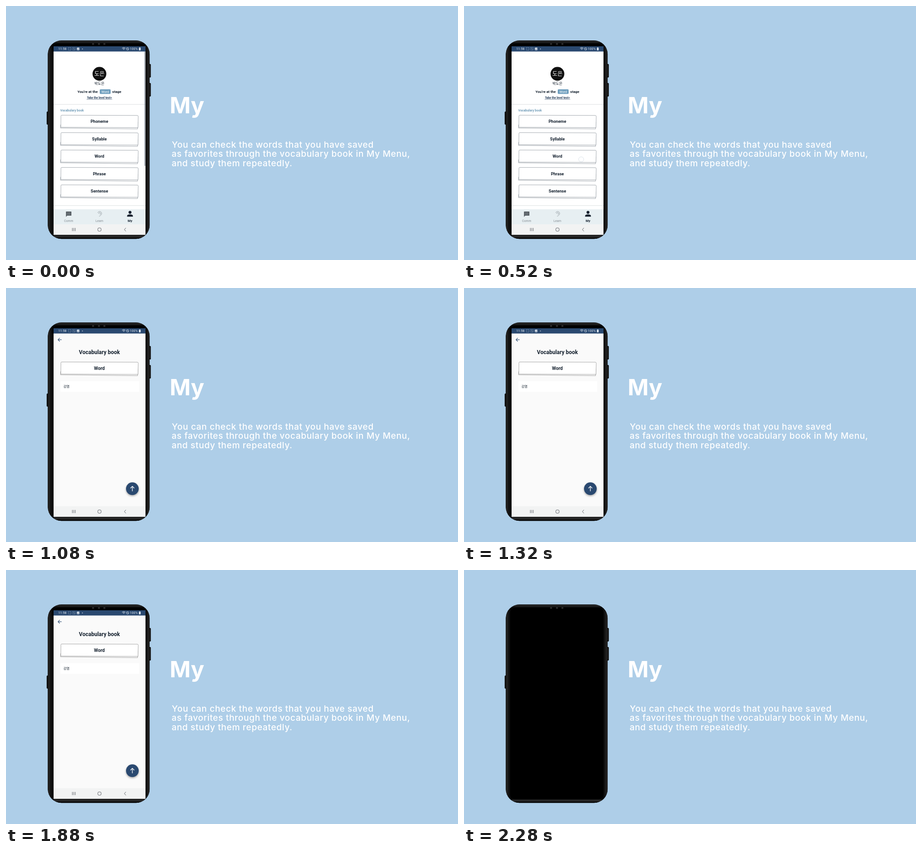
Recreate the animation shown at these times as an HTML page with a canvas. Size 998 by 561 pixels, loop 8 s.

```html
<!DOCTYPE html>
<html lang="en">
<head>
<meta charset="utf-8">
<title>My menu</title>
<style>
html, body { margin: 0; width: 100%; height: 100%; overflow: hidden; background: #aecee8; }
canvas, svg { position: absolute; left: 0; top: 0; width: 998px; height: 561px; }
text { font-family: Inter, sans-serif; font-optical-sizing: none; fill: #fff; }
.title { font-size: 49.5px; font-weight: 700; }
.copy { font-size: 19.15px; font-weight: 500; letter-spacing: .65px; }
</style>
</head>
<body>
<canvas id="stage"></canvas>
<svg viewBox="0 0 998 561">
  <text class="title" x="361.5" y="237">My</text>
  <g class="copy">
    <text x="366" y="312.7">You can check the words that you have saved</text>
    <text x="365.7" y="333.4">as favorites through the vocabulary book in My Menu,</text>
    <text x="365.7" y="354.1">and study them repeatedly.</text>
  </g>
</svg>
<script>
const LOOP = 8000, OPEN_BOOK = 680, SCREEN_OFF = 2280;
const W = 998, H = 561;
const NAVY = '#2a4970', INK = '#14202e';
const ROBOTO = 'Roboto, "Noto Sans CJK KR", "Noto Sans CJK", sans-serif';
const KOREAN = '"Noto Sans CJK KR", "Noto Sans CJK", sans-serif';

const canvas = document.getElementById('stage');
const c = canvas.getContext('2d');
const dpr = window.devicePixelRatio || 1;
canvas.width = Math.round(W * dpr);
canvas.height = Math.round(H * dpr);

function rect(x, y, w, h, fill) {
  c.fillStyle = fill;
  c.fillRect(x, y, w, h);
}

function round(x, y, w, h, r, fill) {
  c.beginPath();
  c.roundRect(x, y, w, h, r);
  c.fillStyle = fill;
  c.fill();
}

function disc(x, y, r, fill) {
  c.beginPath();
  c.arc(x, y, r, 0, Math.PI * 2);
  c.fillStyle = fill;
  c.fill();
}

function ring(x, y, r, color, width) {
  c.beginPath();
  c.arc(x, y, r, 0, Math.PI * 2);
  c.strokeStyle = color;
  c.lineWidth = width;
  c.stroke();
}

function line(color, width, ...pts) {
  c.beginPath();
  for (let i = 0; i < pts.length; i += 2) c.lineTo(pts[i], pts[i + 1]);
  c.strokeStyle = color;
  c.lineWidth = width;
  c.stroke();
}

function label(str, x, y, size, { weight = 700, color = INK, align = 'center', font = ROBOTO } = {}) {
  c.font = `${weight} ${size}px ${font}`;
  c.textAlign = align;
  c.fillStyle = color;
  c.fillText(str, x, y);
}

function gradient(x0, y0, x1, y1, ...stops) {
  const g = c.createLinearGradient(x0, y0, x1, y1);
  for (const [at, color] of stops) g.addColorStop(at, color);
  return g;
}

function phone() {
  const body = [92.4, 76.3, 224.7, 438, 30];
  for (const y of [128, 170]) {
    round(315, y, 4.8, 30, 1.8, '#101010');
    line('#3a3a3a', 0.7, 317.7, y + 3, 317.7, y + 27);
  }
  round(89.8, 233, 4.5, 29, 1.8, '#101010');
  round(...body, '#060606');
  c.save();
  c.beginPath();
  c.roundRect(...body);
  c.clip();
  const side = [[0, '#0a0a0a'], [0.2, '#252423'], [0.5, '#131313'], [1, '#000']];
  rect(92, 76, 13, 439, gradient(92, 0, 105, 0, ...side));
  rect(304.5, 76, 13, 439, gradient(317.5, 0, 304.5, 0, ...side));
  rect(105, 76, 200, 8, gradient(0, 76, 0, 84, [0, '#050505'], [0.3, '#292929'], [1, '#000']));
  rect(105, 505, 200, 10, gradient(0, 505, 0, 515, [0, '#000'], [0.45, '#303030'], [0.65, '#171717'], [0.8, '#000']));
  c.restore();
  round(102, 84, 206, 422, 10, '#000');
  for (const x of [192, 205, 217]) round(x - 2, 82, 4.5, 3.6, 1.5, '#303030');
}

function statusBar() {
  const pale = '#dfe7f0';
  rect(105, 89, 203, 11.5, NAVY);
  label('11:58', 115.5, 97.4, 7.3, { weight: 400, color: pale, align: 'left' });
  c.setLineDash([1.5, 1.5]);
  c.strokeStyle = '#b9c6d6';
  c.lineWidth = 0.7;
  c.strokeRect(138, 92, 5.5, 5.5);
  c.strokeRect(147.5, 92, 5.5, 5.5);
  c.setLineDash([]);
  line('#b9c6d6', 0.7, 148.8, 93.3, 151.8, 96.3);
  rect(156.5, 92, 5.5, 5.5, pale);
  line(NAVY, 0.8, 157, 96.5, 158.7, 94.6, 160, 95.8, 161.5, 94);
  disc(168.8, 94.8, 0.9, pale);
  for (const r of [1.5, 3.5, 5.5]) {
    c.beginPath();
    c.arc(260, 97.3, r, -2.35, -0.8);
    c.strokeStyle = pale;
    c.lineWidth = 0.9;
    c.stroke();
  }
  ring(268.5, 94.7, 2.7, pale, 0.8);
  line(pale, 0.8, 266.6, 92.8, 270.4, 96.6);
  label('100%', 273.5, 97.4, 7.2, { weight: 400, color: pale, align: 'left' });
  round(293.5, 92, 3.8, 6, 0.8, pale);
  rect(294.6, 91.3, 1.6, 1, pale);
}

function systemNav() {
  rect(105, 482, 203, 23.5, '#f2f3f3');
  for (const x of [146.5, 149.7, 152.9]) line('#4c5157', 0.9, x, 490.2, x, 497.2);
  c.beginPath();
  c.roundRect(202.8, 490.2, 7.2, 7.2, 2.4);
  c.strokeStyle = '#4c5157';
  c.lineWidth = 0.9;
  c.stroke();
  line('#4c5157', 0.9, 264.8, 490, 261.3, 493.8, 264.8, 497.6);
}

// Sketchy card: a box with a slightly tilted second sheet under it.
function card(y, str, size, color) {
  line(color, 0.7, 120.5, y + 21, 120.3, y + 28.3, 170, y + 28.8, 230, y + 29.6, 290.5, y + 30.3, 291.5, y + 15);
  c.beginPath();
  c.moveTo(123, y);
  c.lineTo(290, y + 0.5);
  c.quadraticCurveTo(292, y + 0.6, 292, y + 3);
  c.lineTo(291.4, y + 27.4);
  c.lineTo(121, y + 26.6);
  c.lineTo(121.3, y + 2);
  c.quadraticCurveTo(121.4, y, 123, y);
  c.fillStyle = '#fff';
  c.fill();
  c.strokeStyle = color;
  c.lineWidth = 0.7;
  c.stroke();
  label(str, 206.2, y + 14 + size * 0.36, size);
}

function tabs() {
  rect(105, 449, 203, 33, '#e7eff2');
  // speech bubble
  c.beginPath();
  c.moveTo(132.5, 454);
  c.lineTo(144.3, 454);
  c.lineTo(144.3, 463);
  c.lineTo(135, 463);
  c.lineTo(132.5, 465.7);
  c.fillStyle = '#4d545a';
  c.fill();
  for (const y of [456.5, 458.7, 460.9]) line('#a9b2b7', 0.6, 134.3, y, 142.5, y);
  label('Comm', 138.4, 477, 6.8, { weight: 400, color: '#838b91' });
  // ear
  c.beginPath();
  c.arc(206.7, 458.3, 4.5, -2.8, 0.9);
  c.quadraticCurveTo(208, 463.5, 205.6, 464.6);
  c.moveTo(204.6, 458.8);
  c.arc(206.7, 458.5, 2.1, 3, 1.4);
  c.strokeStyle = '#8f989e';
  c.lineWidth = 0.9;
  c.stroke();
  label('Learn', 206.2, 477, 6.8, { weight: 400, color: '#838b91' });
  // person
  disc(273.8, 455.7, 3.2, INK);
  c.beginPath();
  c.moveTo(267.4, 465.3);
  c.lineTo(267.4, 463.5);
  c.bezierCurveTo(267.4, 459, 280.2, 459, 280.2, 463.5);
  c.lineTo(280.2, 465.3);
  c.fillStyle = INK;
  c.fill();
  label('My', 273.8, 477, 7.2);
}

function menuPage(t) {
  rect(105, 100, 203, 405, '#fff');
  disc(206.3, 149.7, 15.2, '#111');
  label('도은', 206.3, 154.2, 12.3, { weight: 400, color: '#fff', font: KOREAN });
  label('박도은', 206.3, 173.6, 8, { weight: 500, font: KOREAN });
  label("You're at the", 157.8, 192.4, 8, { align: 'left' });
  round(207, 184, 24, 10.2, 1.8, '#709fbe');
  label('Word', 219, 191.6, 7, { weight: 400, color: '#fff' });
  label('stage', 234.6, 192.4, 8, { align: 'left' });
  label('Take the level test>', 206.2, 204.8, 6.35, { weight: 600, color: '#29415d' });
  line('#29415d', 0.6, 178, 206.2, 234.5, 206.2);
  line('#dcdfe1', 1, 105, 217.3, 308, 217.3);
  label('Vocabulary book', 119.8, 232.8, 6.9, { color: '#719cb8', align: 'left' });
  ['Phoneme', 'Syllable', 'Word', 'Phrase', 'Sentense'].forEach((str, i) =>
    card(241.2 + i * 38.45, str, 9.1, '#7d868e'));
  line('#dcdfe1', 1, 105, 440.8, 308, 440.8);
  const bar = Math.min(1, Math.max(0, (440 - t) / 320));
  if (bar) rect(305.7, 100.5, 1.6, 252.5, `rgba(95,108,124,${0.8 * bar})`);
  tabs();
}

function bookPage() {
  rect(105, 100, 203, 405, '#fafafa');
  line(NAVY, 1.1, 122.8, 114.2, 115, 114.2);
  line(NAVY, 1.1, 118.6, 110.4, 114.9, 114.2, 118.6, 118);
  label('Vocabulary book', 206.3, 145.7, 12);
  card(163.4, 'Word', 10.1, '#858585');
  rect(120, 206, 174, 23.5, '#fff');
  label('감염', 127, 220.4, 7.2, { weight: 500, align: 'left', font: KOREAN });
  c.save();
  c.shadowColor = 'rgba(0,0,0,.35)';
  c.shadowBlur = 4 * dpr;
  c.shadowOffsetY = 2 * dpr;
  disc(279, 443.3, 14, NAVY);
  c.restore();
  line('#fff', 1.3, 279, 449, 279, 438);
  line('#fff', 1.3, 274.8, 442.2, 279, 438, 283.2, 442.2);
}

// Touch marker that shows while a finger is down.
function touch(t, from, to, x, y, strength) {
  if (t < from || t >= to) return;
  const a = strength * Math.min(1, (t - from + 40) / 80);
  disc(x, y, 5.8, `rgba(255,255,255,${0.5 * a})`);
  ring(x, y, 5.6, `rgba(165,185,203,${a})`, 0.9);
}

function draw(t) {
  c.setTransform(dpr, 0, 0, dpr, 0, 0);
  rect(0, 0, W, H, '#aecee8');
  phone();
  if (t >= SCREEN_OFF) return;
  if (t < OPEN_BOOK) menuPage(t);
  else bookPage();
  statusBar();
  systemNav();
  touch(t, 440, 600, 258.7, 338.7, 0.45);
  touch(t, 2120, SCREEN_OFF, 244.3, 217.8, 0.9);
}

const start = performance.now();
function tick() {
  draw((performance.now() - start) % LOOP);
  requestAnimationFrame(tick);
}
tick();
</script>
</body>
</html>
```
